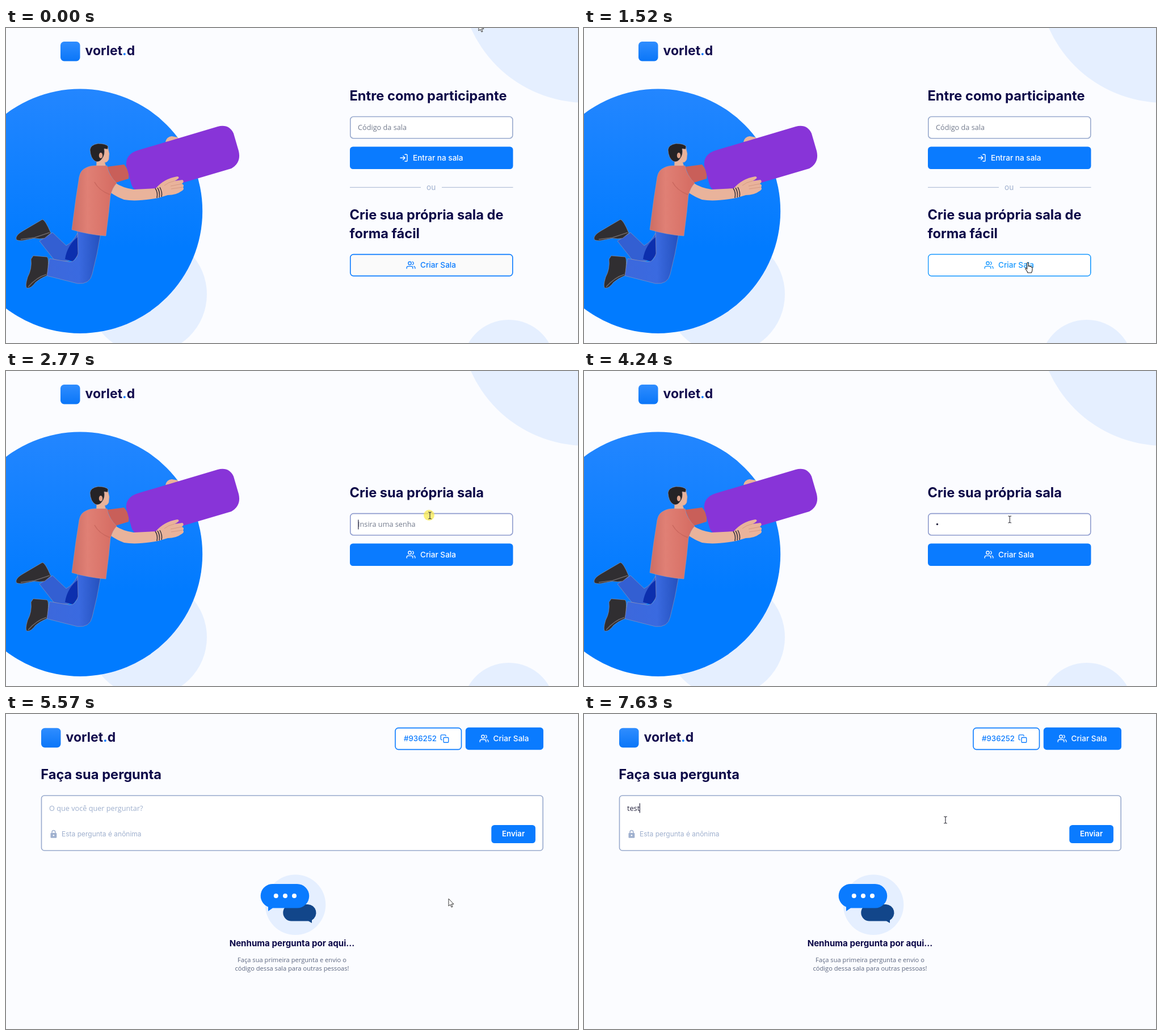
Animation, 1008 px wide and 556 px high, one loop 8 s. Source, as an HTML page:

```html
<!DOCTYPE html>
<html lang="pt-BR">
<head>
<meta charset="utf-8">
<title>Sala de perguntas</title>
<style>
html, body { margin: 0; width: 100%; height: 100%; overflow: hidden; background: #fbfcff; }
svg.stage { display: block; width: 100%; height: 100%; }

text { font: 500 13.6px Inter, sans-serif; fill: #0a7bff; }
.title { font-weight: 700; font-size: 23.65px; fill: #0b0747; }
.brand { font-weight: 700; font-size: 23px; fill: #120b4d; }
.brand tspan { fill: #0a7bff; }
.body { font: 400 12.7px "Open Sans", sans-serif; fill: #737b8d; }
.hint { fill: #9fb0ce; }
.typed { fill: #26253f; }
.note { font-weight: 400; font-size: 12px; fill: #9fb0ce; }
.empty { font-weight: 700; font-size: 15.1px; fill: #0b0747; text-anchor: middle; }
.sub { font: 400 11.15px "Open Sans", sans-serif; fill: #5d6780; text-anchor: middle; }
.light { fill: #fff; }
.pale { fill: #e5efff; }
.solid { fill: #0a7bff; }
.field { fill: #fff; stroke: #98a9cd; stroke-width: 1.6; }
.focus { stroke: #8e9bce; }
.outline { fill: #fafafa; stroke: #0a7bff; stroke-width: 1.6; }
.icon { fill: none; stroke: #0a7bff; stroke-width: 2; stroke-linecap: round; stroke-linejoin: round; }
.icon.white { stroke: #fff; }
.cta .outline, .cta .icon { stroke: currentColor; }
.cta text { fill: currentColor; }
.skin { fill: #e9b39b; }
.shoe { fill: #302e31; }
.caret { fill: #26253f; }

/* timeline: 8 s, 1 % = 80 ms */
[class*="a-"] { animation: 8s step-end infinite; }
.a-home { animation-name: home; }
.a-entry { animation-name: entry; }
.a-create { animation-name: create; }
.a-room { animation-name: room; }
.a-tint { animation-name: tint; }
.a-hover { animation-name: hover; }
.a-hover2 { animation-name: hover2; }
.a-arrow { animation-name: arrow; }
.a-hand { animation-name: hand; }
.a-beam { animation-name: beam; }
.a-press { animation-name: press; }
.a-blink { animation-name: blink; }
.a-hint { animation-name: hint; }
.a-dot { animation-name: dot; }
.a-ask { animation-name: ask; }
.a-t1 { animation-name: t1; }
.a-t2 { animation-name: t2; }
.a-t3 { animation-name: t3; }
.a-t4 { animation-name: t4; }
.a-line { animation-name: line; }
.a-move { animation-name: move; animation-timing-function: ease-out; }

@keyframes home { 0% { opacity: 1 } 69.625%, to { opacity: 0 } }
@keyframes entry { 0% { opacity: 1 } 28.875%, to { opacity: 0 } }
@keyframes create { 0% { opacity: 0 } 28.875% { opacity: 1 } 69.625%, to { opacity: 0 } }
@keyframes room { 0% { opacity: 0 } 69.625%, to { opacity: 1 } }
@keyframes tint { 0% { color: #0a7bff } 13.1875%, to { color: #1798ff } }
@keyframes hover { 0% { opacity: 0 } 13.1875%, to { opacity: 1 } }
@keyframes hover2 { 0% { opacity: 0 } 55.625%, to { opacity: 1 } }
@keyframes arrow {
  0% { opacity: 1 } 13.1875% { opacity: 0 } 28.875% { opacity: 1 } 32% { opacity: 0 }
  54.125% { opacity: 1 } 55.625% { opacity: 0 } 69.625% { opacity: 1 } 72%, to { opacity: 0 }
}
@keyframes hand { 0% { opacity: 0 } 13.1875% { opacity: 1 } 28.875% { opacity: 0 } 55.625% { opacity: 1 } 69.625%, to { opacity: 0 } }
@keyframes beam { 0% { opacity: 0 } 32% { opacity: 1 } 54.125% { opacity: 0 } 72%, to { opacity: 1 } }
@keyframes press {
  0% { opacity: 0 } 27.25% { opacity: 1 } 28.875% { opacity: 0 } 34.625% { opacity: 1 } 40.625% { opacity: 0 }
  58.875% { opacity: 1 } 62.125% { opacity: 0 } 81.375% { opacity: 1 } 83.875%, to { opacity: 0 }
}
@keyframes blink {
  0% { opacity: 0; transform: none } 34.625% { opacity: 1; transform: none } 40.625% { opacity: 0; transform: none }
  44.75% { opacity: 1; transform: translateX(5px) } 51.375%, to { opacity: 0; transform: translateX(5px) }
}
@keyframes hint { 0% { opacity: 1 } 44.75%, to { opacity: 0 } }
@keyframes dot { 0% { opacity: 0 } 44.75%, to { opacity: 1 } }
@keyframes ask { 0% { opacity: 1 } 88.875%, to { opacity: 0 } }
@keyframes t1 { 0% { fill-opacity: 0 } 88.875%, to { fill-opacity: 1 } }
@keyframes t2 { 0% { fill-opacity: 0 } 90.5%, to { fill-opacity: 1 } }
@keyframes t3 { 0% { fill-opacity: 0 } 93%, to { fill-opacity: 1 } }
@keyframes t4 { 0% { fill-opacity: 0 } 94.625%, to { fill-opacity: 1 } }
@keyframes line {
  0% { opacity: 0; transform: none } 81.375% { opacity: 1; transform: none }
  88.875% { opacity: 1; transform: translateX(4.5px) } 90.5% { opacity: 1; transform: translateX(11.5px) }
  93% { opacity: 1; transform: translateX(17.5px) } 94.625%, to { opacity: 1; transform: translateX(22px) }
}
@keyframes move {
  0% { transform: translate(833px, -8px) }
  5.75% { transform: translate(833px, -8px); animation-timing-function: ease-in-out }
  12.375% { transform: translate(792px, 389px) }
  15.625% { transform: translate(784px, 411px) }
  19%, 28.875% { transform: translate(782px, 414px); animation-timing-function: ease-in-out }
  33.75%, 51.375% { transform: translate(747px, 255px); animation-timing-function: ease-in-out }
  58.875%, 69.625% { transform: translate(780px, 326px); animation-timing-function: ease-in-out }
  76.5% { transform: translate(641px, 188px) }
  78.125%, to { transform: translate(637px, 187px) }
}
</style>
</head>
<body>
<svg class="stage" viewBox="0 0 1008 556" xmlns="http://www.w3.org/2000/svg">
  <defs>
    <linearGradient id="disc" x2="0" y2="1">
      <stop offset="0" stop-color="#2386ff"/><stop offset=".65" stop-color="#017bff"/>
    </linearGradient>
    <linearGradient id="mark" x2="0" y2="1">
      <stop stop-color="#2f8dff"/><stop offset="1" stop-color="#0a76f8"/>
    </linearGradient>
    <linearGradient id="shirt">
      <stop stop-color="#cc6d64"/><stop offset=".35" stop-color="#e08075"/><stop offset="1" stop-color="#d56b61"/>
    </linearGradient>
    <linearGradient id="jeans">
      <stop stop-color="#3c68dc"/><stop offset=".6" stop-color="#3a6ae0"/><stop offset="1" stop-color="#2450bd"/>
    </linearGradient>
    <g id="users">
      <path d="M17 21v-2a4 4 0 0 0-4-4H5a4 4 0 0 0-4 4v2M23 21v-2a4 4 0 0 0-3-3.87M16 3.13a4 4 0 0 1 0 7.75"/>
      <circle cx="9" cy="7" r="4"/>
    </g>
    <g id="logo">
      <rect width="34.5" height="34.5" rx="6.5" fill="url(#mark)"/>
      <text class="brand" x="43.5" y="24">vorlet<tspan>.</tspan>d</text>
    </g>
  </defs>

  <rect width="1008" height="556" fill="#fbfcff"/>

  <g class="a-home">
    <circle class="pale" cx="1022" cy="-90" r="222"/>
    <circle class="pale" cx="886" cy="597" r="82"/>
    <circle class="pale" cx="249" cy="470" r="105"/>
    <circle cx="130.5" cy="323.2" r="215.7" fill="url(#disc)"/>
    <use href="#logo" x="96" y="24"/>

    <!-- flying man with plank -->
    <path d="M178 245L208 241Q218 252 216 266L190 274Z" fill="#c95f59"/>
    <path class="skin" d="M281 201Q283 192 292 191L303 193V199Z"/>
    <path d="M232 216L373 174Q393 169 401 186L410 217Q415 238 397 248L309 274 250 290 232 286Q224 286 221 276L212 243Q210 223 232 216Z" fill="#8834d8"/>
    <g stroke="#a79fae" stroke-opacity=".55" stroke-width="1">
      <path d="M126 362Q118 378 106 384L82 361 59 376 84 408Q110 418 130 400Z" fill="#335fd2"/>
      <path d="M128 368Q108 382 104 408L118 412 130 396Z" fill="#0c2fae" stroke="none"/>
      <path class="shoe" d="M18 373Q16 366 30 358L64 338Q69 338 79 362L68 371Q60 373 50 371L30 375Q20 376 18 373Z"/>
      <path d="M126 358L167 362Q161 400 152 434Q148 453 126 451L71 437 77 407 112 413Q123 413 127 398Z" fill="url(#jeans)"/>
      <path class="shoe" d="M48 402L72 404Q77 406 72 437Q60 442 52 449Q44 460 37 459Q33 457 38 440Q46 425 44 408Z"/>
      <path class="skin" d="M165 208L179 208 182 222 181 232Q178 238 174 237L177 247H159L160 230Z"/>
      <path d="M148 215Q149 206 162 204Q176 204 180 209L179 214 173 213Q175 224 169 231Q164 238 157 235Q149 230 148 215Z" fill="#252326"/>
    </g>
    <path d="M26 373L50 370 77 361M39 457Q54 440 71 435" fill="none" stroke="#6d6768" stroke-width="1.5"/>
    <ellipse cx="167" cy="225" rx="3.2" ry="5" fill="#dfa28a"/>
    <path class="skin" d="M192 273Q205 282 225 285L264 283Q278 266 302 262Q309 264 297 270L311 268Q315 271 310 275Q315 277 312 281Q315 285 309 288Q300 295 285 295L268 300Q230 307 208 303Q195 298 185 291Z"/>
    <path d="M290 279L310 275M291 284L311 281M279 278Q286 272 297 270" fill="none" stroke="#d59a84" stroke-width="1"/>
    <path d="M263 283Q268 290 266 300M267 282Q272 290 270 299M271 281Q276 290 274 298" fill="none" stroke="#34313e" stroke-width="1.5"/>
    <path d="M137 249Q147 242 160 243H178Q181 260 195 274Q188 281 184 295L181 326 176 367Q146 365 116 356L123 302 129 263Q131 253 137 249Z" fill="url(#shirt)" stroke="#a79fae" stroke-opacity=".5"/>
    <path d="M156 272Q164 287 183 294" fill="none" stroke="#c9675e" stroke-width="1.5"/>

    <g class="a-entry">
      <text class="title" x="605.5" y="127.5">Entre como participante</text>
      <rect class="field" x="606.8" y="156.5" width="286" height="38.2" rx="5.5"/>
      <text class="body" x="620" y="180">Código da sala</text>
      <rect class="solid" x="606" y="209.5" width="287.5" height="39.5" rx="5.5"/>
      <path class="icon white" transform="translate(693 221.2) scale(.67)" d="M15 3h4a2 2 0 0 1 2 2v14a2 2 0 0 1-2 2h-4M10 17l5-5-5-5M15 12H3"/>
      <text class="light" x="717" y="233.5">Entrar na sala</text>
      <path d="M606 281.3H731M768 281.3H893.5" stroke="#a5b5d0" stroke-width="1"/>
      <text class="hint" x="741" y="286" style="font-weight:400">ou</text>
      <text class="title" x="605.5" y="337.5">Crie sua própria sala de</text>
      <text class="title" x="605.5" y="370.5">forma fácil</text>
      <g class="cta a-tint">
        <rect class="outline" x="606.8" y="399.6" width="286" height="38" rx="5.5"/>
        <rect class="a-hover" x="607.6" y="400.4" width="284.4" height="36.4" rx="4.7" fill="#fff"/>
        <use class="icon" href="#users" transform="translate(705.5 410.5) scale(.67)"/>
        <text x="730" y="422.7">Criar Sala</text>
      </g>
    </g>

    <g class="a-create">
      <text class="title" x="605.5" y="222.5">Crie sua própria sala</text>
      <rect class="field focus" x="606.8" y="251.6" width="286" height="38.2" rx="5.5"/>
      <text class="body a-hint" x="620" y="275">Insira uma senha</text>
      <circle class="a-dot" cx="622.5" cy="270.5" r="1.7" fill="#26253f"/>
      <rect class="caret a-blink" x="620.3" y="262.5" width="1.2" height="17"/>
      <rect class="solid" x="606" y="304.5" width="287.5" height="39.5" rx="5.5"/>
      <rect class="a-hover2" x="606" y="304.5" width="287.5" height="39.5" rx="5.5" fill="#1798ff"/>
      <use class="icon white" href="#users" transform="translate(705.5 316) scale(.67)"/>
      <text class="light" x="730" y="328.5">Criar Sala</text>
    </g>
  </g>

  <g class="a-room">
    <use href="#logo" x="62" y="24.7"/>
    <rect class="outline" x="686" y="24.6" width="116.5" height="38" rx="5.5" style="fill:#fff"/>
    <text x="701" y="47.5" style="font-size:13.3px">#936252</text>
    <g class="icon" transform="translate(765 35.5) scale(.67)">
      <rect x="9" y="9" width="13" height="13" rx="2"/>
      <path d="M5 15H4a2 2 0 0 1-2-2V4a2 2 0 0 1 2-2h9a2 2 0 0 1 2 2v1"/>
    </g>
    <rect class="solid" x="809.8" y="23.8" width="137.2" height="39.4" rx="5.5"/>
    <use class="icon white" href="#users" transform="translate(834.5 35.2) scale(.67)"/>
    <text class="light" x="858.5" y="47.7">Criar Sala</text>

    <text class="title" x="61.2" y="115">Faça sua pergunta</text>
    <rect class="field" x="62.5" y="144" width="883.7" height="97" rx="5"/>
    <text class="body hint a-ask" x="76" y="171">O que você quer perguntar?</text>
    <text class="body typed" x="76" y="171"><tspan class="a-t1">t</tspan><tspan class="a-t2">e</tspan><tspan class="a-t3">s</tspan><tspan class="a-t4">t</tspan></text>
    <rect class="caret a-line" x="75.7" y="157.5" width="1.2" height="17"/>
    <path d="M81 210V208.5a2.9 2.9 0 0 1 5.8 0V210" fill="none" stroke="#9fb0ce" stroke-width="1.5"/>
    <rect x="78.5" y="210" width="10.8" height="8.7" rx="1.3" fill="#9fb0ce"/>
    <circle cx="83.9" cy="214.3" r="1.3" fill="#fff"/>
    <text class="note" x="98" y="216.3">Esta pergunta é anônima</text>
    <rect class="solid" x="855.3" y="196" width="77.7" height="32" rx="5.5"/>
    <text class="light" x="874" y="216.3" style="font-weight:600;font-size:13.3px">Enviar</text>

    <circle class="pale" cx="510" cy="336.7" r="53.3"/>
    <path d="M503 336H532a15 15 0 0 1 7 28V369L533 365.5H503a14.7 14.7 0 0 1 0-29.5Z" fill="#12468a"/>
    <path class="solid" d="M471 300H513a21 21 0 0 1 0 42.5H470L462 348V340.5A21 21 0 0 1 471 300Z"/>
    <g fill="#fff"><circle cx="475.8" cy="321" r="4"/><circle cx="492" cy="321" r="4"/><circle cx="508" cy="321" r="4"/></g>
    <text class="empty" x="504" y="410">Nenhuma pergunta por aqui...</text>
    <text class="sub" x="504" y="437.5">Faça sua primeira pergunta e envio o</text>
    <text class="sub" x="504" y="452.5">código dessa sala para outras pessoas!</text>
  </g>

  <g class="a-move">
    <circle class="a-press" cx="-1.5" cy="-.5" r="9.5" fill="#f8e94f" fill-opacity=".75"/>
    <path class="a-arrow" d="M0 0V13L3 10.3 5 15 7 14.2 5 9.6H9Z" fill="#fff" stroke="#222" stroke-width=".9"/>
    <path class="a-hand" d="M-1.300 1Q0-1 1.300 1V6.500Q3 5 4 7Q5.500 6 6.300 8Q8 7.300 8 9.500V13Q8 15 6.500 18H0Q-1 15-4 11.500Q-4.500 9-2.500 10L-1.300 11.300Z" fill="#fff" stroke="#222" stroke-width="1.1"/>
    <path class="a-beam" d="M-2.800-6Q-.5-6 0-5Q.5-6 2.800-6M0-5V5M-2.800 6Q-.5 6 0 5Q.5 6 2.800 6" fill="none" stroke="#2b2b35" stroke-width="1.1"/>
  </g>
</svg>
</body>
</html>
```
